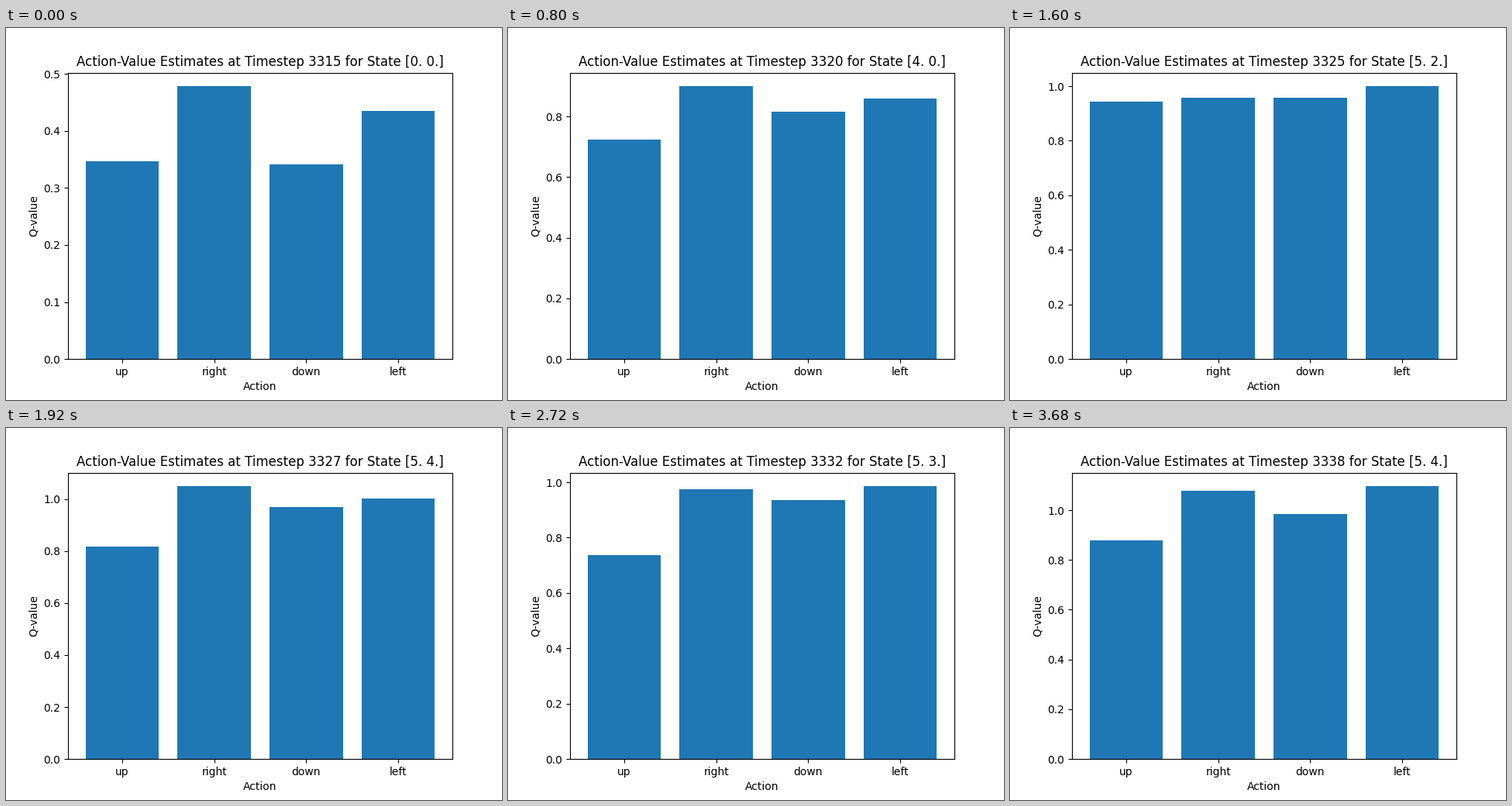
Recreate the animation shown at these times as a matplotlib script. Size 640 by 480 pixels, loop 3.84 s.

```python
import matplotlib.pyplot as plt
import numpy as np
from matplotlib.animation import FuncAnimation

ACTIONS = ["up", "right", "down", "left"]
FIRST_STEP = 3315
FRAME_MS = 160

# The agent's walk through the grid; "." is a bump that leaves it in place
WALK = ".RRRRR..DDDD....UL..R.D"
MOVES = {".": (0, 0), "R": (1, 0), "L": (-1, 0), "D": (0, 1), "U": (0, -1)}
states = np.cumsum([(0, 0)] + [MOVES[m] for m in WALK], axis=0)

# Key Q-values (in ACTIONS order) at a few steps of the walk
KEY_VALUES = {
    1: (0.3467, 0.4781, 0.3412, 0.4350),
    5: (0.7237, 0.8996, 0.8158, 0.8590),
    7: (0.8400, 1.0150, 0.9100, 0.9600),
    9: (0.9100, 1.0480, 0.9550, 0.9950),
    10: (0.9430, 0.9570, 0.9570, 0.9995),
    14: (0.8162, 1.0488, 0.9684, 1.0004),
    17: (0.7370, 0.9750, 0.9355, 0.9855),
    20: (0.3229, 0.6846, 0.7147, 0.2990),
    22: (0.7850, 1.0350, 0.9600, 1.0780),
    23: (0.8786, 1.0780, 0.9844, 1.0959),
}


def q_values(step):
    """Blend the keys of the current state, or all keys if it has none."""
    own = [k for k in KEY_VALUES if (states[k] == states[step]).all()]
    keys = own or list(KEY_VALUES)
    # blending squares makes the growth slow down towards the next key
    squares = np.array([KEY_VALUES[k] for k in keys]) ** 2
    return np.sqrt([np.interp(step, keys, column) for column in squares.T])


fig, ax = plt.subplots(figsize=(6.4, 4.8), dpi=100)


def draw(step):
    x, y = states[step]
    ax.clear()
    bars = ax.bar(ACTIONS, q_values(step), color="#1f77b4")
    ax.set_xlabel("Action")
    ax.set_ylabel("Q-value")
    ax.set_title(
        f"Action-Value Estimates at Timestep {FIRST_STEP + step}"
        f" for State [{x}. {y}.]"
    )
    return list(bars)


def reset():
    return draw(0)


anim = FuncAnimation(
    fig, draw, frames=len(states), init_func=reset,
    interval=FRAME_MS, repeat=True, repeat_delay=0, blit=False,
)
plt.show()
```
